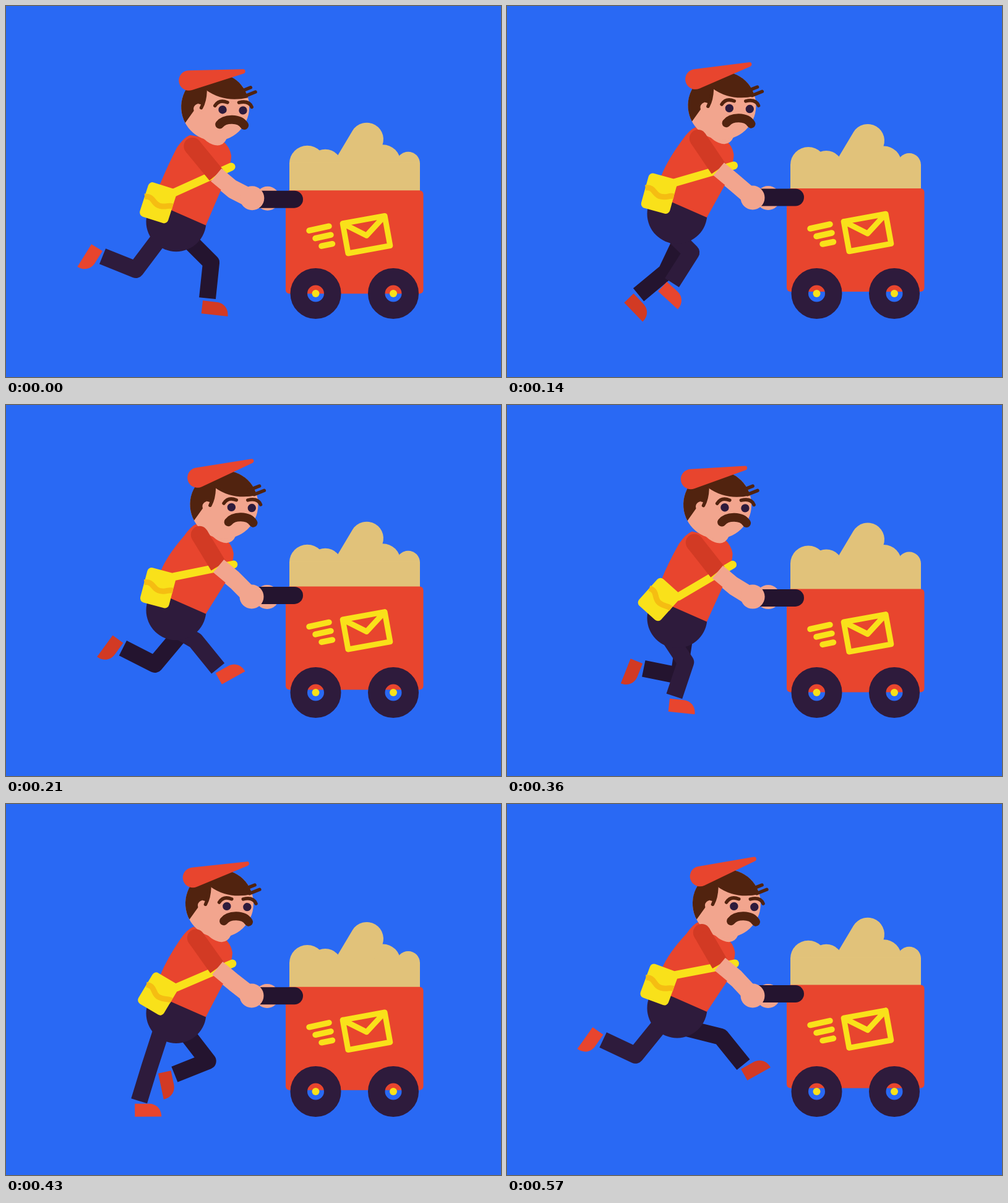
Animation, 800 px wide and 600 px high, one loop 640 ms. Source, as an HTML page with a canvas:

```html
<!DOCTYPE html>
<html lang="en">
<head>
<meta charset="utf-8">
<title>Mail run</title>
<style>
html, body { margin: 0; width: 100%; height: 100%; overflow: hidden; background: #2969f4; }
canvas { display: block; }
</style>
</head>
<body>
<canvas id="stage" width="800" height="600"></canvas>
<script>
const ctx = document.getElementById('stage').getContext('2d');
const BLUE = '#2969f4', RED = '#e8452e', RUST = '#d23a24', YELLOW = '#f9e11a', AMBER = '#f5bd12',
  PAPER = '#e1c27a', SKIN = '#f2a58e', BROWN = '#51230f', DARK = '#2e1b3c', DARKER = '#24142f';

const STRIDE = 9, STEP = STRIDE / 2; // in poses
const SHIN = 58;

// Key poses of a leg: phase, thigh and shin angle from straight down, forward positive
const LEG_KEYS = [
  [0, -37, -112], [1.25, 34, -86], [3, 60, 39], [3.5, 76, 39], [4, 39, 28],
  [4.5, 45, -6], [5.5, 22, -31], [6, -18, -17], [7.5, -40, -117], [9, -37, -112]
];

const radians = degrees => degrees * Math.PI / 180;

function legAngles(phase) {
  const next = LEG_KEYS.findIndex(key => key[0] > phase);
  const a = LEG_KEYS[next - 1], b = LEG_KEYS[next];
  const mix = (phase - a[0]) / (b[0] - a[0]);
  return [1, 2].map(i => a[i] + (b[i] - a[i]) * mix);
}

function disc(color, x, y, r) {
  ctx.fillStyle = color;
  ctx.beginPath();
  ctx.arc(x, y, r, 0, 7);
  ctx.fill();
}

function box(color, x, y, w, h, r) {
  ctx.fillStyle = color;
  ctx.beginPath();
  ctx.roundRect(x, y, w, h, r);
  ctx.fill();
}

function shape(color, d) {
  ctx.fillStyle = color;
  ctx.fill(new Path2D(d));
}

function stroke(color, width, d, cap = 'round') {
  ctx.strokeStyle = color;
  ctx.lineWidth = width;
  ctx.lineCap = cap;
  ctx.lineJoin = 'round';
  ctx.stroke(new Path2D(d));
}

function at(x, y, degrees, draw) {
  ctx.save();
  ctx.translate(x, y);
  ctx.rotate(radians(degrees));
  draw();
  ctx.restore();
}

function cart(y, mailY) {
  at(0, mailY, 0, () => {
    disc(PAPER, 487, 255, 29);
    disc(PAPER, 516, 259, 27);
    disc(PAPER, 609, 253, 28.5);
    disc(PAPER, 650, 255, 19);
    stroke(PAPER, 54, 'M583 216L552 268');
    box(PAPER, 458, 254, 211, 60, 0);
  });
  at(0, y, 0, () => {
    box(RED, 452, 299, 222.5, 167, 6);
    stroke(YELLOW, 9.5, 'M490 364L522 357M500 376.5L525 371M510 389L527.5 385.5');
    at(582.5, 370.5, -10.3, () =>
      stroke(YELLOW, 9, 'M-34.5 -24.5H34.5V24.5H-34.5ZL0 1.5L34.5 -24.5'));
  });
  for (const x of [500.5, 626]) {
    stroke(DARK, 27.5, `M${x - 27.25} 465a27.25 27.25 0 1 1 54.5 0a27.25 27.25 0 1 1 -54.5 0Z`);
    disc(YELLOW, x, 465, 6);
  }
}

function leg(phase, hipX, hipY, trousers, leather) {
  const [thigh, shin] = legAngles(phase);
  const thighSin = Math.sin(radians(thigh));
  const length = 68 - 9 * thighSin;
  const kneeX = hipX + length * thighSin;
  const kneeY = hipY + length * Math.cos(radians(thigh));
  const ankleX = kneeX + SHIN * Math.sin(radians(shin));
  const ankleY = kneeY + SHIN * Math.cos(radians(shin));
  const grounded = Math.exp(-((phase - 5.6) ** 2));

  stroke(trousers, 27, `M${hipX} ${hipY}L${kneeX} ${kneeY}L${ankleX} ${ankleY}`, 'butt');
  at(ankleX, ankleY, 10 - shin - 32 * grounded, () =>
    shape(leather, 'M-7 4.5H16C27 4.5 36 12.5 36 25.5H-7Z'));
}

// Outline around a large disc and a small one at the tip of the peak
function cap(x, y, tipX, tipY) {
  const R = 16.3, r = 3.5;
  const aim = Math.atan2(tipY - y, tipX - x);
  const spread = Math.acos((R - r) / Math.hypot(tipX - x, tipY - y));
  ctx.fillStyle = RED;
  ctx.beginPath();
  ctx.arc(x, y, R, aim + spread, aim - spread + 2 * Math.PI);
  ctx.arc(tipX, tipY, r, aim - spread, aim + spread);
  ctx.fill();
}

function head(hairLift) {
  ctx.translate(-334, -165);
  shape(SKIN, 'M305 203Q322 227 340 227Q350 226 354 216L350 200Z');
  disc(SKIN, 334, 165, 55);
  shape(BROWN, `M286.4 192.5A55 55 0 1 1 386.3 148Q348 158 318 138
    Q318 155 314 167Q311 172 308 166L306 160L300 172Z`);
  disc(SKIN, 307, 169, 8);
  stroke(BROWN, 5.5, 'M317 140Q317 156 311.5 167');
  stroke(BROWN, 5.5, `M374 ${142 - hairLift}l16 -7M382 ${149 - hairLift}l16 -7`);
  disc(DARK, 346, 169, 6.7);
  disc(DARK, 379, 169, 6.7);
  stroke(BROWN, 5.5, 'M333.5 163Q340 152 353.5 157M372 156.5Q388 152 393 163');
  stroke(BROWN, 14, 'M342 193C350 182 374 181 382 193');
}

function draw(pose) {
  // Each landing jolts the runner down; the body then rises until the next one
  const sinceLanding = (pose + 0.5) % STEP;
  const rise = Math.sqrt(sinceLanding) / 2;
  const jolt = Math.exp(-4 * sinceLanding);
  const sinceBagKick = (pose + 5) % STRIDE;

  const hip = 9 - 29 * rise;
  const headX = 1 + 5 * sinceLanding + 5 * jolt, headY = 17 * jolt - 4;
  const shoulderX = 298 + 0.8 * headX, shoulderY = 228 + hip;
  const cuffX = 339 + 1.3 * sinceLanding, cuffY = 281 - 22 * rise;
  const handX = 397 + 6 * jolt, handY = 310 + 6 * jolt;
  const strapX = 363 + 0.26 * headX, strapY = 258 + 15 * jolt;
  const bagX = 246, bagY = 322 - 7.5 * sinceLanding;
  const bagAngle = 14 + 46 * Math.exp(-sinceBagKick / 2);
  const cartY = -1.6 * sinceLanding, mailY = 2 - 0.45 * (sinceLanding - 2) ** 4;
  const arm = `M${cuffX} ${cuffY}L${cuffX + 24} ${cuffY + 20}L${handX} ${handY}`;

  ctx.fillStyle = BLUE;
  ctx.fillRect(0, 0, 800, 600);
  cart(cartY, mailY);

  at(4, 6, 0, () => stroke(SKIN, 26, arm, 'butt'));
  disc(SKIN, handX + 25, handY + 0.5, 19.5);
  box(DARKER, 405, 299.5 + cartY, 75, 28, [0, 14, 14, 0]);

  leg((pose + STEP) % STRIDE, 288, 372 + hip / 2, DARKER, RUST);
  leg(pose, 254, 369 + hip, DARK, RED);
  disc(DARK, 275, 350 + hip, 48.5);

  shape(RED, `M323 ${356 + hip}L${strapX - 13} ${strapY + 29}
    Q${strapX} ${strapY - 3} ${strapX} ${strapY - 18}
    Q${strapX - 2} ${strapY - 32} ${strapX - 14} ${strapY - 42}
    L${shoulderX - 4} ${shoulderY - 18}
    Q${shoulderX - 14} ${shoulderY - 14} ${shoulderX - 25} ${shoulderY + 2}
    Q260 ${262 + hip} 250 ${287 + hip}L232 ${316 + hip}Z`);

  const cos = Math.cos(radians(bagAngle)), sin = Math.sin(radians(bagAngle));
  stroke(YELLOW, 13, `M${bagX + 20 * cos + 24 * sin} ${bagY + 20 * sin - 24 * cos}L${strapX} ${strapY}`);
  at(bagX, bagY, bagAngle, () => {
    box(YELLOW, -24, -29, 48, 58, 7);
    stroke(AMBER, 9, 'M-24 -3C-10 -9 -8 5 4 4S14 -1 24 -2', 'butt');
  });

  at(334 + headX, 165 + headY, 2, () => head(2 + 11 * jolt));
  cap(291 + headX + 3 * jolt, 121 - sinceLanding, 378.5 + headX + 4 * jolt, 115 - 26 * rise);

  disc(RUST, shoulderX, shoulderY, 14);
  stroke(RUST, 28, `M${shoulderX} ${shoulderY}L${cuffX} ${cuffY}`, 'butt');
  stroke(SKIN, 27, arm, 'butt');
  disc(SKIN, handX, handY, 19.5);
}

// Nine held poses of 70 ms, except that the fourth lasts 80 ms
function tick() {
  const t = performance.now() % 640;
  draw(t < 290 ? Math.min(3, Math.floor(t / 70)) : Math.floor((t - 10) / 70));
  requestAnimationFrame(tick);
}
tick();
</script>
</body>
</html>
```
